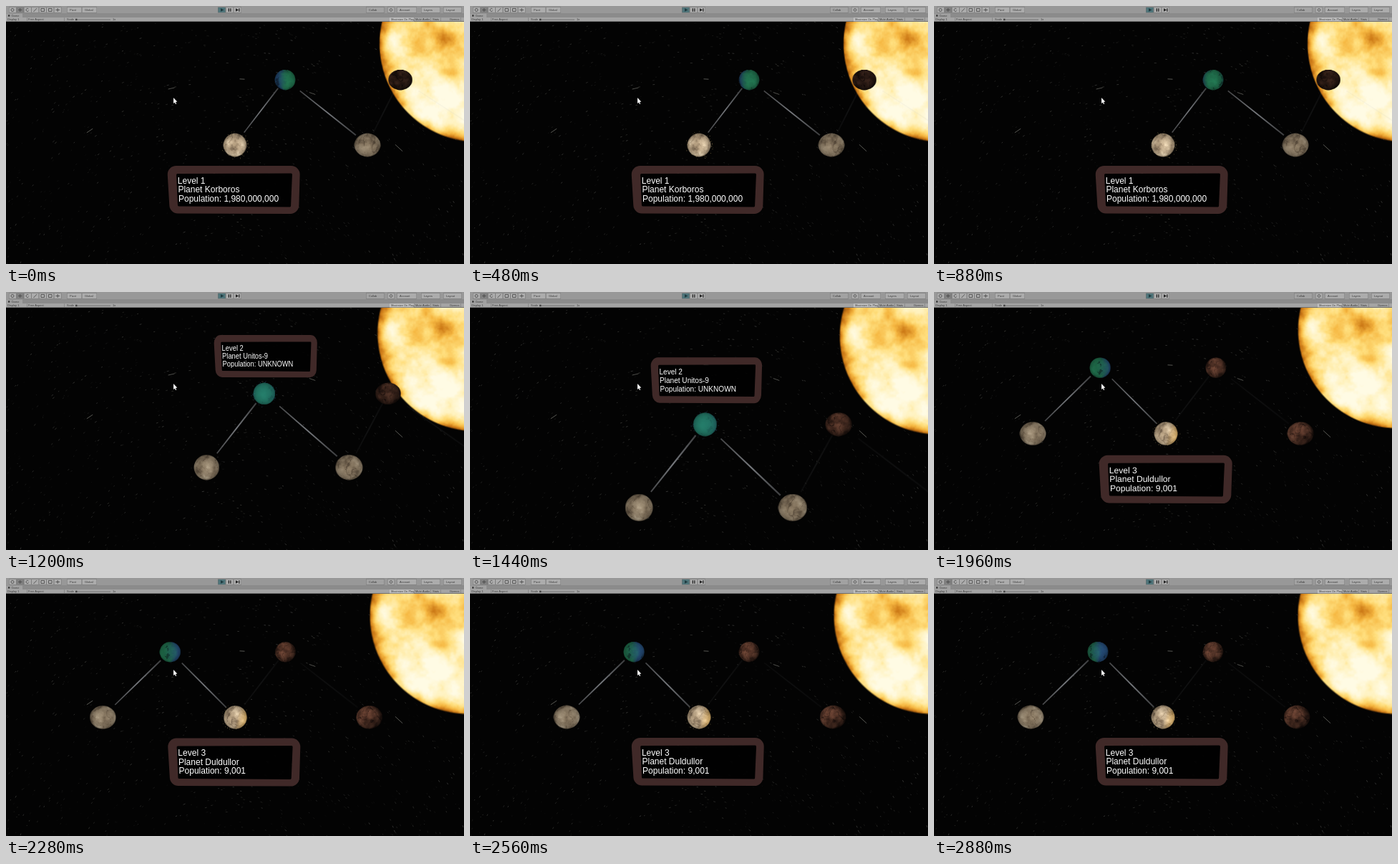
These frames come from a looping animation (640x360 px, 2920 ms). An HTML page with a canvas:

```html
<!DOCTYPE html>
<html lang="en">
<head>
<meta charset="utf-8">
<title>Planet select</title>
<style>
html, body { margin: 0; width: 100%; height: 100%; overflow: hidden; background: #000; }
canvas { display: block; width: 100vw; height: 100vh; }
</style>
</head>
<body>
<canvas id="stage" width="640" height="360"></canvas>
<script>
const ctx = document.getElementById('stage').getContext('2d');
const LOOP = 2920, STEP = 40;
const TO_SECOND = 1111, TO_THIRD = 1481, RATE = 0.0069;
const SECOND_X = 0.435;
const FONT = '"Liberation Sans", Arial, sans-serif';

const clamp = (v, a = 0, b = 1) => Math.min(b, Math.max(a, v));
const smooth = v => v * v * (3 - 2 * v);
const mix = (a, b, k) => a + (b - a) * k;
const mixColor = (a, b, k) => a.map((v, i) => mix(v, b[i], k));

function makeRandom(seed) {
  return () => {
    seed = (seed * 1664525 + 1013904223) >>> 0;
    return seed / 4294967296;
  };
}

// Value noise that repeats every `period` cells horizontally
function noise(x, y, period, seed) {
  const xi = Math.floor(x), yi = Math.floor(y);
  const fx = smooth(x - xi), fy = smooth(y - yi);
  const at = (a, b) => {
    a = ((a % period) + period) % period;
    const v = Math.sin(a * 127.1 + b * 311.7 + seed * 74.7) * 43758.5453;
    return v - Math.floor(v);
  };
  return mix(mix(at(xi, yi), at(xi + 1, yi), fx), mix(at(xi, yi + 1), at(xi + 1, yi + 1), fx), fy);
}

function fbm(x, y, period, seed, octaves = 4) {
  let sum = 0, amp = 0.5, total = 0;
  for (let i = 0; i < octaves; i++) {
    sum += amp * noise(x, y, period, seed + i);
    total += amp;
    x *= 2; y *= 2; period *= 2; amp *= 0.55;
  }
  return sum / total;
}

function ramp(stops, k) {
  const p = clamp(k) * (stops.length - 1);
  const i = Math.min(stops.length - 2, Math.floor(p));
  return mixColor(stops[i], stops[i + 1], p - i);
}

function makeCanvas(w, h) {
  const c = document.createElement('canvas');
  c.width = w;
  c.height = h;
  return c;
}

// ---- Camera ----
function cameraAt(t) {
  let x = 0, lift = 0;
  if (t >= TO_SECOND) {
    const k = 1 - Math.exp(-RATE * (Math.min(t, TO_THIRD) - TO_SECOND));
    x = SECOND_X * k;
    lift = k;
  }
  if (t >= TO_THIRD) {
    const k = Math.exp(-RATE * (t - TO_THIRD));
    x = 1 - (1 - x) * k;
    lift *= k;
  }
  return { x, lift, scale: 1 / (1 - 0.154 * lift) };
}

// ---- Planets ----
const ROCK = [[92, 78, 62], [138, 121, 98], [166, 149, 124], [204, 189, 162]];
const RUST = [[26, 15, 12], [62, 38, 29], [96, 60, 46], [118, 78, 61]];
const planets = [
  { at: 0, top: false, colors: ROCK, seed: 3, spin: 0.5 },
  { at: SECOND_X, top: true, seed: 8, spin: 0.88 },
  { at: 1, top: false, colors: ROCK, seed: 14, spin: 0.5 },
  { at: 1 + SECOND_X, top: true, colors: RUST, seed: 21, spin: 0.4 },
  { at: 2.012, top: false, colors: RUST, seed: 29, spin: 0.4 }
];
const TW = 128, TH = 64, D = 44;

for (const p of planets) {
  p.texture = [];
  for (let y = 0; y < TH; y++) for (let x = 0; x < TW; x++) {
    const n = fbm(x / TW * 10, y / TH * 5, 10, p.seed);
    if (p.colors) {
      const crack = Math.abs(noise(x / TW * 12, y / TH * 5, 12, p.seed + 9) - 0.5);
      p.texture.push(ramp(p.colors, (n - 0.15) * 1.4 - (crack < 0.025 ? 0.25 : 0)));
    } else {
      const green = smooth(clamp(0.3 + Math.cos((x / TW) * 2 * Math.PI) * 0.75 + (n - 0.5) * 0.6));
      const c = mixColor([38, 78, 122], [34, 116, 80], green);
      p.texture.push(c.map(v => v * (n < 0.33 ? 0.6 : 0.78 + n * 0.4)));
    }
  }
}

// Normals and angles for one sphere, shared by all planets
const sphere = [];
for (let y = 0; y < D; y++) for (let x = 0; x < D; x++) {
  const nx = (x + 0.5) / D * 2 - 1, ny = (y + 0.5) / D * 2 - 1;
  const r = Math.hypot(nx, ny);
  const nz = Math.sqrt(Math.max(0, 1 - r * r));
  sphere.push({ nx, ny, nz, alpha: clamp((1 - r) * D / 2), lon: Math.atan2(nx, nz), lat: Math.asin(clamp(ny, -1, 1)) });
}
const ball = makeCanvas(D, D);
const ballCtx = ball.getContext('2d');
const ballData = ballCtx.createImageData(D, D);

function place(p, cam) {
  const gap = p.top ? 161 : 185;
  const x = 320 + gap * cam.scale * (p.at - cam.x);
  const y = p.top ? 103 + (cam.scale - 1) * 510 : 194 + (cam.scale - 1) / 0.0015;
  const r = (p.top ? 14.5 : 16.6) * cam.scale;
  return { x, y, r, rx: r * (1 + 0.12 * ((x - 320) / 185) ** 2) };
}

function drawPlanet(index, pos, t, selected, cam) {
  const p = planets[index], rust = p.colors === RUST, sea = !p.colors;
  const turn = sea ? p.spin * t / 1000 - 0.95 : p.spin * t / 1000;
  let gain = selected ? 1.32 : 0.95;
  if (rust) gain = 0.62 + 0.45 * clamp(cam.x / 0.5);
  if (sea) gain = 0.94;
  sphere.forEach((s, i) => {
    const u = Math.floor(((s.lon + turn) / (2 * Math.PI) + 2) * TW) % TW;
    const v = clamp(Math.floor((s.lat / Math.PI + 0.5) * TH), 0, TH - 1);
    let c = p.texture[v * TW + u];
    if (selected && sea) c = mixColor(c, [40, 136, 126], 0.65);
    if (selected && index === 2) c = mixColor(c, [208, 158, 72], 0.6 * clamp(s.nx * 1.2 + s.ny * 0.3 - 0.2));
    let light = 0.55 + 0.47 * s.nz;
    if (rust) light = clamp(0.32 + 0.68 * s.nz - 0.22 * s.nx - 0.15 * s.ny, 0.1, 1.1);
    const o = i * 4;
    for (let j = 0; j < 3; j++) ballData.data[o + j] = c[j] * light * gain;
    ballData.data[o + 3] = 255 * s.alpha;
  });
  ballCtx.putImageData(ballData, 0, 0);
  ctx.drawImage(ball, pos.x - pos.rx, pos.y - pos.r, pos.rx * 2, pos.r * 2);
}

function drawSparks(index, pos, t) {
  const rnd = makeRandom(50 + index);
  const color = index === 1 ? '60,110,150' : '200,175,115';
  for (let i = 0; i < 46; i++) {
    const a = rnd() * 6.283 + t * 0.0006 * (rnd() - 0.3);
    const d = pos.r * (0.85 + rnd() * 0.35);
    ctx.fillStyle = `rgba(${color},${0.15 + rnd() * 0.4})`;
    ctx.fillRect(pos.x + Math.cos(a) * d, pos.y + Math.sin(a) * d, 0.9, 0.9);
  }
}

function drawLink(a, b, strength, scale) {
  const at = k => [mix(a.x, b.x, k), mix(a.y, b.y, k) - 1];
  const [x0, y0] = at(0.18), [x1, y1] = at(0.86);
  const g = ctx.createLinearGradient(x0, y0, x1, y1);
  g.addColorStop(0, `rgba(140,142,146,${strength * 0.65})`);
  g.addColorStop(0.5, `rgba(156,160,166,${strength})`);
  g.addColorStop(1, `rgba(130,132,136,${strength * 0.6})`);
  const len = Math.hypot(x1 - x0, y1 - y0);
  const nx = (y0 - y1) / len * scale, ny = (x1 - x0) / len * scale;
  ctx.fillStyle = g;
  ctx.beginPath();
  ctx.moveTo(x0 + nx * 0.8, y0 + ny * 0.8);
  ctx.lineTo(x1 + nx, y1 + ny);
  ctx.lineTo(x1 - nx, y1 - ny);
  ctx.lineTo(x0 - nx * 0.8, y0 - ny * 0.8);
  ctx.fill();
}

// ---- Sky ----
const sky = makeCanvas(640, 360);
(() => {
  const g = sky.getContext('2d'), rnd = makeRandom(77);
  g.fillStyle = '#030303';
  g.fillRect(0, 0, 640, 360);
  const streak = (x, y, len, alpha) => {
    const a = Math.atan2(x - 310, 460 - y);
    const dx = Math.cos(a) * len / 2, dy = Math.sin(a) * len / 2;
    g.strokeStyle = `rgba(190,190,180,${alpha})`;
    g.lineWidth = 0.9;
    g.beginPath();
    g.moveTo(x - dx, y - dy);
    g.lineTo(x + dx, y + dy);
    g.stroke();
  };
  for (let i = 0; i < 1300; i++) {
    const x = rnd() * 640, y = 22 + rnd() * 338;
    streak(x, y, 1 + rnd() * 2.2, 0.05 + 0.24 * rnd() ** 2);
  }
  [[117, 174, 10, 0.5], [231, 115, 9, 0.45], [330, 102, 7, 0.5], [428, 122, 9, 0.45], [549, 198, 14, 0.5]]
    .forEach(s => streak(...s));
})();

// ---- Sun ----
const SUN_R = 138;
const sun = makeCanvas(SUN_R * 2, SUN_R * 2);
(() => {
  const g = sun.getContext('2d'), size = SUN_R * 2;
  const img = g.createImageData(size, size);
  const fire = [[120, 62, 10], [206, 124, 24], [246, 184, 66], [255, 222, 124], [255, 242, 190], [255, 251, 228]];
  const patch = (x, y, px, py, r) => Math.exp(-((x - px) ** 2 + (y - py) ** 2) / (r * r));
  for (let py = 0; py < size; py++) for (let px = 0; px < size; px++) {
    const x = px + 0.5 - SUN_R, y = py + 0.5 - SUN_R, r = Math.hypot(x, y);
    const n = fbm(px / 34, py / 34, 64, 5, 5);
    let k = 0.76 + (n - 0.5) * 1.1;
    k -= 0.3 * patch(x, y, -88, 0, 20) + 0.32 * patch(x, y, -46, -8, 22) + 0.14 * patch(x, y, -40, 44, 20);
    k += 0.15 * patch(x, y, -70, 62, 36) + 0.12 * patch(x, y, -25, 95, 34);
    k -= 0.55 * clamp((r / SUN_R - 0.84) / 0.16) ** 1.6;
    const o = (py * size + px) * 4;
    ramp(fire, k).forEach((v, j) => { img.data[o + j] = v; });
    img.data[o + 3] = 255 * clamp((SUN_R - r) / 2);
  }
  g.putImageData(img, 0, 0);
})();

// ---- Info panel ----
function roundPath(points, r) {
  const n = points.length;
  ctx.moveTo((points[0][0] + points[1][0]) / 2, (points[0][1] + points[1][1]) / 2);
  for (let i = 1; i <= n; i++) {
    const a = points[i % n], b = points[(i + 1) % n];
    ctx.arcTo(a[0], a[1], b[0], b[1], r);
  }
  ctx.closePath();
}

const OUTER = [[-93, -33.5], [93, -33.5], [91, 33.5], [-89, 33]];
const INNER = [[-80, -22.5], [82, -23], [80, 24], [-78, 23]];

function drawPanel(lines, x, y, sx, sy, skew) {
  ctx.save();
  ctx.transform(sx, 0, skew, sy, x, y);
  ctx.beginPath();
  roundPath(INNER, 1.5);
  ctx.fillStyle = 'rgba(2,2,2,.9)';
  ctx.fill();
  ctx.beginPath();
  roundPath(OUTER, 12);
  roundPath(INNER, 1.5);
  ctx.fillStyle = '#402928';
  ctx.fill('evenodd');
  ctx.fillStyle = '#fff';
  ctx.font = '12px ' + FONT;
  lines.forEach((s, i) => ctx.fillText(s, -78.2 + i * 0.6, -8.9 + i * 12.6));
  ctx.restore();
}

const INFO = [
  ['Level 1', 'Planet Korboros', 'Population: 1,980,000,000'],
  ['Level 2', 'Planet Unitos-9', 'Population: UNKNOWN'],
  ['Level 3', 'Planet Duldullor', 'Population: 9,001']
];

function drawInfo(index, pos, scale) {
  if (index === 1) {
    const k = scale / 1.0765;
    drawPanel(INFO[1], pos.x + 1.8, 59.5 + 0.78 * (pos.y - 103), 0.78 * k, 0.885 * k, 0);
    return;
  }
  const dx = pos.x - 320, dy = pos.y - 194;
  drawPanel(INFO[index], 318 + 1.33 * dx, 256.5 + 1.42 * dy, 1 + 0.0018 * dy, 1 + 0.0011 * dy, -dx * 0.0007);
}

// ---- Editor bar ----
const bar = makeCanvas(640, 22);
(() => {
  const g = bar.getContext('2d');
  const rect = (c, x, y, w, h) => { g.fillStyle = c; g.fillRect(x, y, w, h); };
  const label = (s, x, y) => { g.fillStyle = '#3c3c3c'; g.font = '4px ' + FONT; g.fillText(s, x, y); };
  const button = (x, w, s, fill = '#acacac') => {
    rect('#747474', x, 1.5, w, 8);
    rect(fill, x + 0.5, 2, w - 1, 7);
    if (s) label(s, x + 4, 7);
  };
  rect('#989898', 0, 0, 640, 22);
  rect('#8b8b8b', 0, 10, 640, 6);
  rect('#a0a0a0', 0, 10.5, 23, 5.5);
  rect('#a4a4a4', 0, 16, 640, 5.5);
  rect('#5c5c5c', 0, 21.3, 640, 0.7);
  for (let i = 0; i < 7; i++) {
    const x = 4 + i * 10.5;
    button(x, 10.5, '', i === 1 ? '#808080' : '#acacac');
    g.strokeStyle = '#444';
    g.lineWidth = 0.8;
    g.beginPath();
    if (i === 0) g.arc(x + 5, 5.5, 2, 0, 7);
    else if (i === 1 || i === 6) { g.moveTo(x + 2.5, 5.5); g.lineTo(x + 8, 5.5); g.moveTo(x + 5.2, 3); g.lineTo(x + 5.2, 8); }
    else if (i === 2) g.arc(x + 5, 5.5, 2, 0.5, 5.5);
    else if (i === 3) { g.moveTo(x + 3, 8); g.lineTo(x + 7.5, 3.2); }
    else g.rect(x + 3, 3.5, 4.5, 4);
    g.stroke();
  }
  button(85, 21, 'Pivot');
  button(106, 21, 'Global');
  button(296, 11, '', '#4f7479');
  button(307, 11, '');
  button(318, 11, '');
  g.fillStyle = '#1d3a40';
  g.beginPath(); g.moveTo(300, 3.2); g.lineTo(304.5, 5.5); g.lineTo(300, 7.8); g.fill();
  rect('#222', 310.7, 3.3, 1.3, 4.5);
  rect('#222', 313.2, 3.3, 1.3, 4.5);
  g.beginPath(); g.moveTo(321, 3.2); g.lineTo(325, 5.5); g.lineTo(321, 7.8); g.fill();
  rect('#222', 325.3, 3.3, 1.2, 4.5);
  button(503, 26, 'Collab', '#a2a2a2');
  button(533, 10, '');
  g.beginPath(); g.arc(538, 5.5, 1.8, 0, 7); g.stroke();
  button(546, 28, 'Account');
  button(580, 27, 'Layers');
  button(611, 26, 'Layout');
  rect('#333', 3, 12.3, 2.3, 2.3);
  label('Game', 7.5, 15);
  label('Display 1', 2, 20.3);
  label('Free Aspect', 31, 20.3);
  label('Scale', 85, 20.3);
  rect('#666', 97, 18.7, 49, 0.8);
  rect('#444', 97, 17.7, 2.5, 2.5);
  label('1x', 149, 20.3);
  rect('#c2c2c2', 536, 16.3, 34, 5);
  label('Maximize On Play', 538, 20.2);
  label('Mute Audio', 572, 20.2);
  label('Stats', 596, 20.2);
  label('Gizmos', 620, 20.2);
  for (const x of [29, 81, 570, 593, 607, 635]) rect('#7e7e7e', x, 16.3, 0.7, 5);
})();

function drawCursor() {
  ctx.beginPath();
  [[234, 128], [234, 136], [235.8, 134.4], [237, 137], [238.2, 136.4], [237.1, 134], [239.3, 133.6]]
    .forEach(([x, y]) => ctx.lineTo(x, y));
  ctx.closePath();
  ctx.fillStyle = '#f4f4f4';
  ctx.fill();
}

function render(t) {
  const cam = cameraAt(t);
  const selected = t < TO_SECOND ? 0 : t < TO_THIRD ? 1 : 2;
  const spots = planets.map(p => place(p, cam));
  ctx.drawImage(sky, 0, 0);
  const sunX = 659 - 13.5 * cam.x, sunY = 52.5 + 10 * cam.lift;
  ctx.drawImage(sun, sunX - SUN_R, sunY - SUN_R);
  [0.75, 0.75, 0.09, 0.07].forEach((k, i) => drawLink(spots[i], spots[i + 1], k, cam.scale));
  spots.forEach((pos, i) => drawPlanet(i, pos, t, i === selected, cam));
  drawSparks(selected, spots[selected], t);
  drawInfo(selected, spots[selected], cam.scale);
  ctx.drawImage(bar, 0, 0);
  drawCursor();
}

const start = performance.now();
function tick() {
  const t = (performance.now() - start) % LOOP;
  render(Math.floor(t / STEP) * STEP);
  requestAnimationFrame(tick);
}
tick();
</script>
</body>
</html>
```
